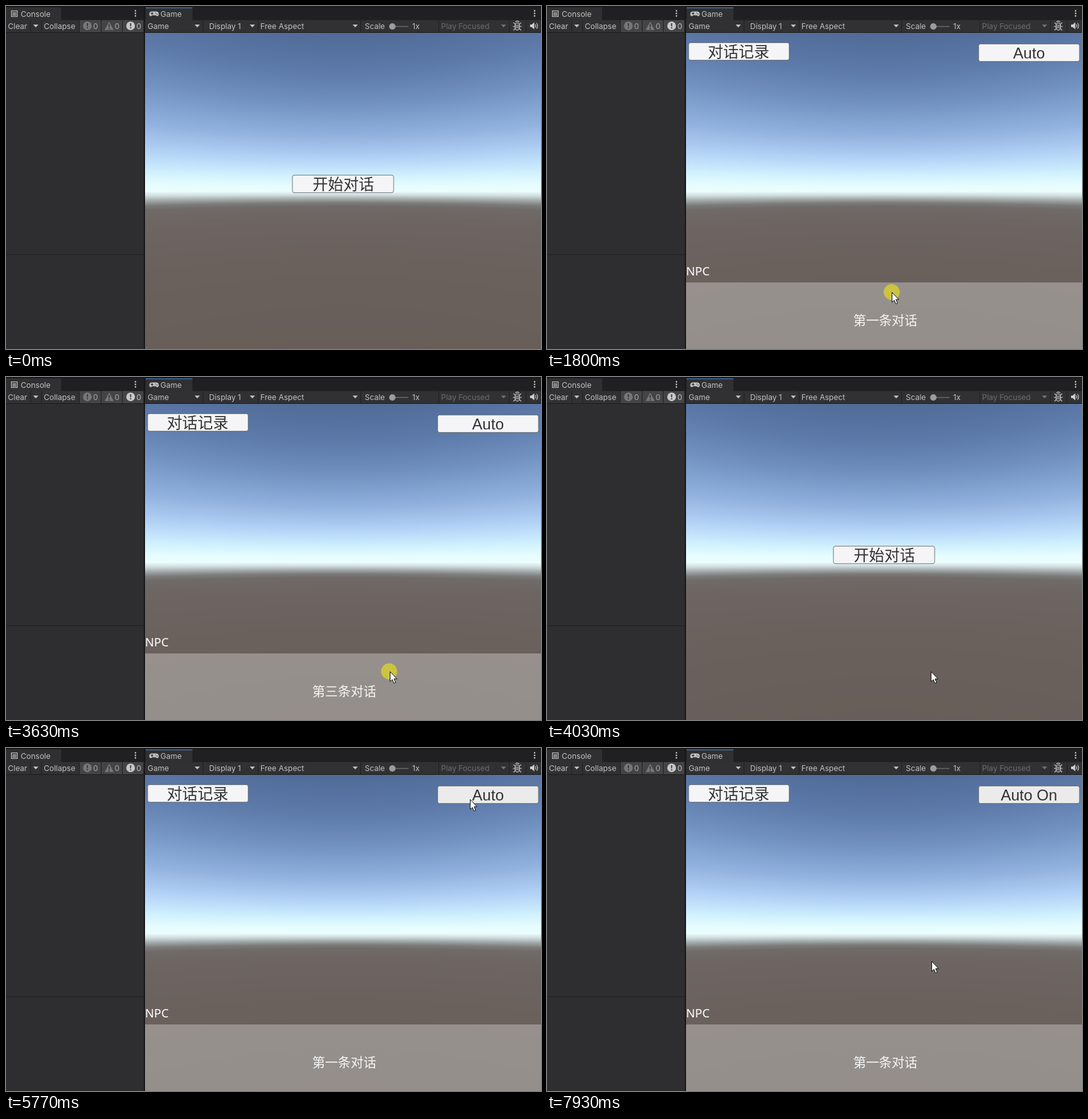
An HTML page with a canvas for the animation above (8000 ms loop, 835 by 536 pixels).

```html
<!DOCTYPE html>
<html lang="zh">
<head>
<meta charset="utf-8">
<title>Dialogue demo</title>
<style>
html, body { margin: 0; width: 100%; height: 100%; overflow: hidden; background: #2e2e30; }
canvas, svg { position: absolute; left: 0; top: 0; }
canvas { left: 217px; top: 42px; }
.ui { font: 12px Inter, sans-serif; fill: #c2c2c2; }
.cjk { font-family: "Noto Sans CJK SC", "Noto Sans CJK", sans-serif; font-weight: 500; text-anchor: middle; fill: #323232; }
.big { font-size: 24px; }
.line { font-size: 20px; fill: #f6f6f6; }
.opt { font-size: 12.5px; }
.npc { font: 500 18.5px "Noto Sans", sans-serif; fill: #fff; }
.auto { font: 24px "Liberation Sans", Arial, sans-serif; text-anchor: middle; fill: #323232; }
.btn { fill: #f5f5f7; stroke: #55585c; stroke-width: .8; }
.anim { animation: 8s step-end infinite; }

#start { animation-name: start; }
#talk { animation-name: talk; }
#line1 { animation-name: line1; }
#line2, #options { animation-name: line2; }
#line3 { animation-name: line3; }
#off { animation-name: off; }
#on { animation-name: on; }
#startBtn { animation-name: startBtn; }
#optBtn { animation-name: optBtn; }
#autoBtn { animation-name: autoBtn; }
#ring { animation-name: ring; }
#cursor { animation-name: cursor; }

@keyframes start { 0%, 50.37% { opacity: 1 } 9.12%, 59.62%, to { opacity: 0 } }
@keyframes talk { 0%, 50.37% { opacity: 0 } 9.12%, 59.62%, to { opacity: 1 } }
@keyframes line1 { 0%, 50.37%, to { opacity: 1 } 24.99% { opacity: 0 } }
@keyframes line2 { 0%, 37.87%, to { opacity: 0 } 24.99% { opacity: 1 } }
@keyframes line3 { 0%, 50.37%, to { opacity: 0 } 37.87% { opacity: 1 } }
@keyframes off { 0% { opacity: 1 } 76.62%, to { opacity: 0 } }
@keyframes on { 0% { opacity: 0 } 76.62%, to { opacity: 1 } }
@keyframes startBtn { 0%, 9.12%, to { fill: #f5f5f7 } 6.62% { fill: #ebebec } 8.37% { fill: #c8c8c8 } }
@keyframes optBtn { 0%, 37.87%, to { fill: #f5f5f7 } 27.12% { fill: #ececed } 34.62% { fill: #e1e1e1 } }
@keyframes autoBtn { 0% { fill: #f5f5f7 } 71% { fill: #ebebec } 74.62% { fill: #d4d4d4 } 76.62%, to { fill: #ebebec } }
@keyframes ring {
  0%, 24.99%, 37.87%, 50.37%, 59.62%, 76.62%, to { opacity: 0; transform: translate(0, 0) }
  22.49% { opacity: .78; transform: translate(538px, 447px) }
  34.62% { opacity: .78; transform: translate(724.5px, 400px) }
  45.37% { opacity: .78; transform: translate(598px, 460px) }
  55.87% { opacity: .78; transform: translate(561px, 278px) }
  74.62% { opacity: .78; transform: translate(724px, 80px) }
}
@keyframes cursor {
  0% { opacity: 0; transform: translate(596px, 505px) }
  .87% { opacity: 1; transform: translate(596px, 505px); animation-timing-function: ease-in-out }
  6.62% { opacity: 1; transform: translate(560px, 278px) }
  12.49% { transform: translate(550px, 304px) }
  12.87% { transform: translate(527px, 362px) }
  14.99% { transform: translate(527px, 362px); animation-timing-function: ease-out }
  17.87% { transform: translate(538px, 447px) }
  27.12% { transform: translate(722px, 385px) }
  29.62% { transform: translate(710px, 395px) }
  31.62% { transform: translate(727px, 400px) }
  37.87% { transform: translate(670px, 437px) }
  41.62% { transform: translate(494px, 487px) }
  45.37% { transform: translate(599px, 460px) }
  55.87% { transform: translate(560px, 278px) }
  64.62% { transform: translate(560px, 278px); animation-timing-function: ease-in-out }
  72.12% { transform: translate(724px, 80px) }
  77.5% { transform: translate(724px, 80px); animation-timing-function: ease-in }
  79.12% { transform: translate(667px, 138px) }
  80.87% { transform: translate(590px, 247px) }
  83.37% { transform: translate(579px, 263px) }
  94.99% { transform: translate(576px, 270px) }
  99.12%, to { opacity: 1; transform: translate(600px, 333px) }
}
</style>
</head>
<body>
<canvas id="sky" width="618" height="494"></canvas>
<svg width="835" height="536" viewBox="0 0 835 536">
  <defs>
    <path id="drop" d="M-4-2H4L0 2.5Z" fill="#c2c2c2"/>
    <g id="dots" fill="#c8c8c8"><circle cy="-4" r="1.2"/><circle r="1.2"/><circle cy="4" r="1.2"/></g>
    <path id="bang" d="M-1-4H1L.7 1H-.7ZM-1 2.2H1V4H-1Z"/>
  </defs>

  <!-- editor chrome -->
  <path d="M0 0H835V22H0Z" fill="#202022"/>
  <path d="M0 0H835V1.5H0Z" fill="#161617"/>
  <path d="M0 2H86V22H0ZM218 2H291V22H218Z" fill="#303032"/>
  <path d="M218 2H291V3.4H218Z" fill="#3a6fa6"/>
  <path d="M0 22H835V41H0Z" fill="#313133"/>
  <path d="M0 41H835V42H0Z" fill="#1c1c1d"/>
  <path d="M115 22H214V41H115Z" fill="#444447"/>
  <path d="M38.5 22V41M55.5 22V41M114.5 22V41M148.5 22V41M181.5 22V41M307.5 22V41M393.5 22V41M553.5 22V41M675.5 22V41M785.5 22V41M811.5 22V41M0 388.5H215" stroke="#202022" fill="none"/>
  <path d="M215 0H217V536H215Z" fill="#18181a"/>

  <g class="ui">
    <text x="23" y="17">Console</text>
    <text x="241" y="17">Game</text>
    <text x="3" y="36">Clear</text>
    <text x="59" y="36">Collapse</text>
    <text x="136" y="36" fill="#a8a8a8">0</text>
    <text x="169.5" y="36" fill="#a8a8a8">0</text>
    <text x="203.5" y="36">0</text>
    <text x="221" y="36">Game</text>
    <text x="317" y="36">Display 1</text>
    <text x="397" y="36">Free Aspect</text>
    <text x="560" y="36">Scale</text>
    <text x="634" y="36">1x</text>
    <text x="679" y="36" fill="#6c6c6e">Play Focused</text>
  </g>

  <use href="#drop" x="46.5" y="31"/>
  <use href="#drop" x="298.5" y="31"/>
  <use href="#drop" x="384.5" y="31"/>
  <use href="#drop" x="545" y="31"/>
  <use href="#drop" x="776.5" y="31" opacity=".45"/>
  <use href="#dots" x="202" y="11.5"/>
  <use href="#dots" x="825" y="11.5"/>

  <path d="M8.5 7.5H17.5V16.5H8.5ZM10 10H16M10 12.2H16M10 14.4H16" fill="none" stroke="#c2c2c2" stroke-width="1.2"/>
  <path d="M227 8.5H235Q238.5 9 238.5 13Q238 17 235 15.5L233.5 14.5H228.5L227 15.5Q224 17 223.5 13Q223.5 9 227 8.5Z" fill="#c2c2c2"/>
  <path d="M226 11.7H230M228 9.7V13.7M233 11H234.4M235 12.6H236.4" stroke="#303032" stroke-width="1.2"/>

  <circle cx="127" cy="31" r="6.8" fill="#77777a"/>
  <path d="M161 24.5L168 37.5H154Z" fill="#77777a"/>
  <circle cx="194.5" cy="31" r="6.8" fill="#c8c8c8"/>
  <g fill="#38383a"><use href="#bang" x="127" y="31"/><use href="#bang" x="161" y="32.5"/><use href="#bang" x="194.5" y="31"/></g>

  <path d="M603 32H628" stroke="#6a6a6c" stroke-width="1.4"/>
  <circle cx="603" cy="32" r="5" fill="#9c9c9e"/>

  <g fill="none" stroke="#c2c2c2" stroke-width="1.2">
    <path d="M792 26L795 28.5M804 26L801 28.5M791 32H805M792 38L795 35M804 38L801 35M795 25Q798 22 801 25"/>
    <ellipse cx="798" cy="32" rx="3.8" ry="5.6"/>
    <path d="M795 30H801M795 34H801"/>
    <path d="M826 28.5Q828 31 826 33.5M828 26.5Q831.5 31 828 35.5"/>
  </g>
  <path d="M818 29H820.5L824.5 25.5V36.5L820.5 33H818Z" fill="#d0d0d0"/>

  <!-- game view -->
  <g id="start" class="anim">
    <rect id="startBtn" class="btn anim" x="447" y="264.3" width="158" height="27.4" rx="3"/>
    <text class="cjk big" x="526.5" y="287">开始对话</text>
  </g>

  <g id="talk" class="anim" opacity="0">
    <path d="M217 432H835V536H217Z" fill="#fff" fill-opacity=".3"/>
    <rect class="btn" x="221" y="57.3" width="157" height="27.4" rx="3"/>
    <text class="cjk big" x="299" y="80">对话记录</text>
    <rect id="autoBtn" class="btn anim" x="673.7" y="59.3" width="157.4" height="27.4" rx="3"/>
    <text id="off" class="auto anim" x="752.3" y="81.5">Auto</text>
    <text id="on" class="auto anim" x="752.3" y="81.5">Auto On</text>
    <text class="npc" x="217" y="421">NPC</text>
    <text id="line1" class="cjk line anim" x="528" y="499">第一条对话</text>
    <text id="line2" class="cjk line anim" x="528" y="499">第二条对话</text>
    <text id="line3" class="cjk line anim" x="528" y="499">第三条对话</text>
    <g id="options" class="anim">
      <rect class="btn" x="628.5" y="335.5" width="197" height="37" rx="3.5"/>
      <text class="cjk opt" x="727" y="358.5">选项2</text>
      <rect id="optBtn" class="btn anim" x="628.5" y="379" width="197" height="37" rx="3.5"/>
      <text class="cjk opt" x="727" y="402.5">选项1</text>
    </g>
  </g>

  <circle id="ring" class="anim" r="12.5" fill="#dcd22c" opacity="0"/>
  <path id="cursor" class="anim" d="M.5.5V16L4 12.8L6.4 18.6L9 17.5L6.6 11.8H11.2Z" fill="#fff" stroke="#111" stroke-width="1"/>
</svg>

<script>
// Sky colour depends on the sine of the view ray's elevation.
const stops = [
  [-.52, 0x675e58], [-.25, 0x6a615d], [-.095, 0x6d6562], [-.056, 0x6f6a68],
  [-.042, 0x7d7c7b], [-.028, 0xa2aaab], [-.014, 0xcfdcdd], [0, 0xecfefe],
  [.021, 0xe6fcfe], [.056, 0xd0f1fd], [.091, 0xbfdffb], [.137, 0xabcaf1],
  [.204, 0x8fafdc], [.309, 0x7090bf], [.404, 0x5c79a8], [.52, 0x4e6894]
];
const channel = (c, k) => c >> (16 - 8 * k) & 255;

function skyColor(s, k) {
  let i = 1;
  while (i < stops.length - 1 && s > stops[i][0]) i++;
  const [a, ca] = stops[i - 1], [b, cb] = stops[i];
  const f = Math.min(1, Math.max(0, (s - a) / (b - a)));
  return channel(ca, k) + (channel(cb, k) - channel(ca, k)) * f;
}

const ctx = document.getElementById('sky').getContext('2d');
const W = 618, H = 494, focal = H / 2 / Math.tan(Math.PI / 6);
const img = ctx.createImageData(W, H);
for (let y = 0, p = 0; y < H; y++) {
  for (let x = 0; x < W; x++) {
    const dx = (x - W / 2) / focal, dy = (H / 2 - y) / focal;
    const s = dy / Math.hypot(1, dx, dy);
    for (let k = 0; k < 3; k++) img.data[p++] = skyColor(s, k);
    img.data[p++] = 255;
  }
}
ctx.putImageData(img, 0, 0);
</script>
</body>
</html>
```
